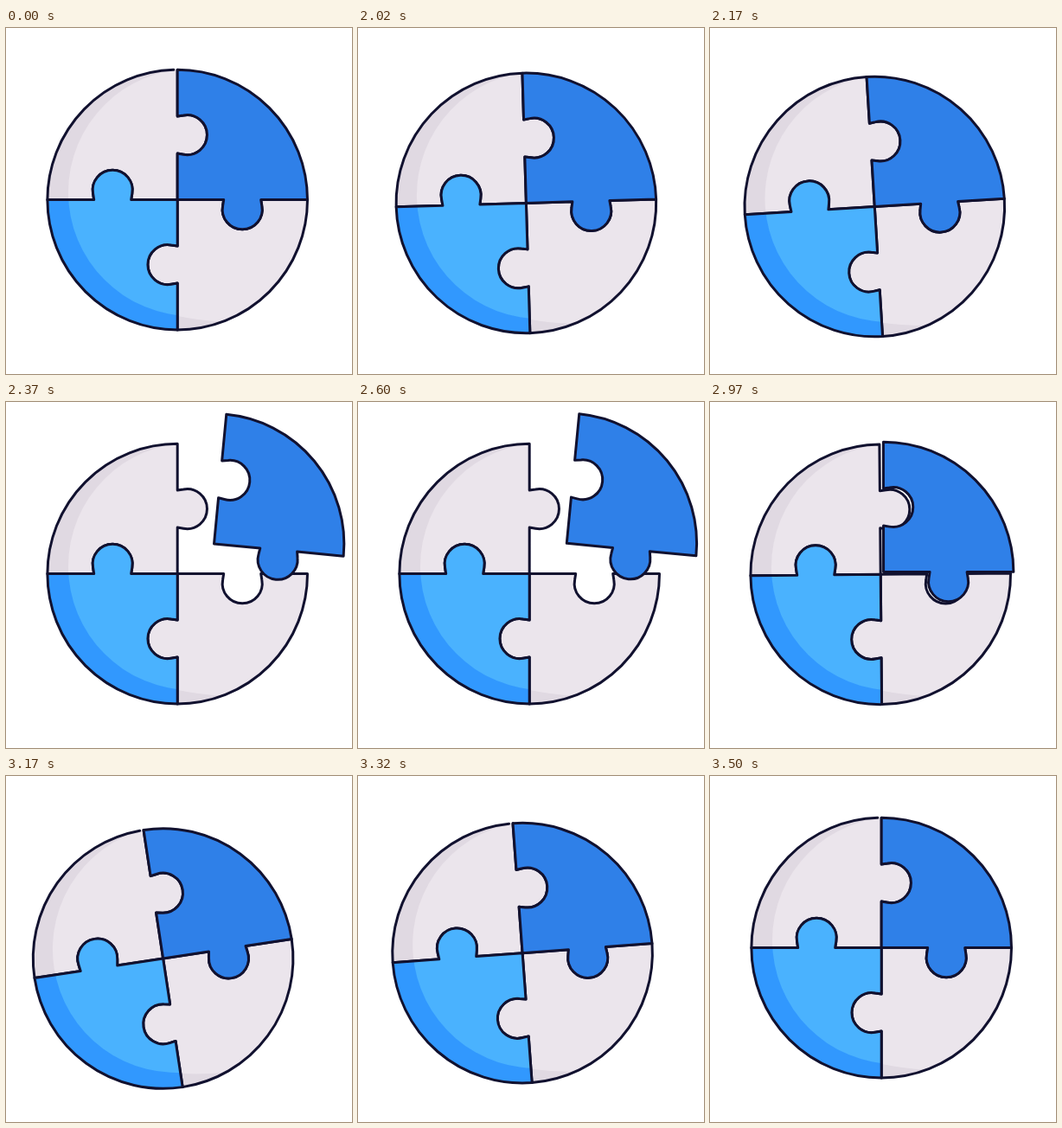
These frames come from a looping animation (400x400 px, 3.52 s). An HTML page with a canvas:

```html
<!DOCTYPE html>
<html lang="en">
<head>
<meta charset="utf-8">
<title>Puzzle circle</title>
<style>
  html, body { margin: 0; width: 100%; height: 100%; overflow: hidden; background: #fff; }
  canvas { display: block; width: 400px; height: 400px; }
</style>
</head>
<body>
<canvas id="stage"></canvas>
<script>
const LOOP = 3520, REST = 2020;
const R = 150.3, CX = 198.2, CY = 198.6;
const INK = '#11112f';
const canvas = document.getElementById('stage');
const ctx = canvas.getContext('2d');
const dpr = window.devicePixelRatio || 1;
canvas.width = canvas.height = 400 * dpr;

// One quarter; the other three are turned copies. It runs from the right end back to the arc.
const SIDES = `M${R} 0 L96.5 0 L97.6 7 A23 23 0 1 1 52.4 7 L53.5 0 L0 0
  L0 -53.5 L7 -52.4 A23 23 0 1 0 7 -97.6 L0 -96.5 L0 ${-R}`;
const quarter = new Path2D(`${SIDES} A${R} ${R} 0 0 1 ${R} 0 Z`);
const slit = 1.7 * Math.PI / 180;
const slitQuarter = new Path2D(
  `${SIDES} A${R} ${R} 0 0 1 ${R * Math.cos(slit)} ${-R * Math.sin(slit)}`);

const highlight = new Path2D();
highlight.arc(16.8, -8.6, 143, 0, 7);
const lowerShade = new Path2D('M-2 134 Q24 139.5 50 141 L50 160 L-2 160 Z');

const ease = {
  hold: () => 0,
  out2: u => 1 - (1 - u) ** 2,
  in2: u => u * u,
  out3: u => 1 - (1 - u) ** 3,
  in3: u => u ** 3,
  outSine: u => Math.sin(u * Math.PI / 2),
  inOut: u => (1 - Math.cos(u * Math.PI)) / 2
};

// Rows: time, easing towards that time, then x, y, degrees
const DISC = [
  [2000, 'hold', 0, 0, 0],
  [2110, 'out2', -11, 11, -4.9],
  [2225, 'in2', 0, 0, 0],
  [2965, 'hold', 0, 0, 0],
  [3130, 'outSine', -17.1, 12.8, -8.9],
  [3500, 'inOut', 0, 0, 0]
];
const PIECE = [
  [2205, 'hold', 0, 0, 0],
  [2455, 'out3', 44, -36, 5.65],
  [2985, 'in3', 0, 0, 0]
];

function pose(rows, t) {
  const i = rows.findIndex(row => t < row[0]);
  if (i < 1) return [0, 0, 0];
  const a = rows[i - 1], b = rows[i];
  const k = ease[b[1]]((t - a[0]) / (b[0] - a[0]));
  return [2, 3, 4].map(n => a[n] + (b[n] - a[n]) * k);
}

function place([x, y, deg]) {
  ctx.translate(x, y);
  ctx.rotate(deg * Math.PI / 180);
}

function drawQuarter(turn, base, shade, light, outline = quarter) {
  const angle = turn * Math.PI / 2;
  ctx.save();
  ctx.rotate(angle);
  ctx.save();
  ctx.fillStyle = base;
  ctx.fill(quarter);
  if (shade) {
    ctx.clip(quarter);
    ctx.rotate(-angle);
    ctx.fillStyle = light;
    ctx.fill(shade);
  }
  ctx.restore();
  ctx.stroke(outline);
  ctx.restore();
}

function draw(now) {
  let t = now % LOOP;
  if (t < REST) t = 0;
  const slitOpen = t < REST || t > 2985;

  ctx.setTransform(dpr, 0, 0, dpr, 0, 0);
  ctx.fillStyle = '#fff';
  ctx.fillRect(0, 0, 400, 400);
  ctx.strokeStyle = INK;
  ctx.lineWidth = 3;
  ctx.lineJoin = ctx.lineCap = 'round';

  ctx.translate(CX, CY);
  place(pose(DISC, t));
  drawQuarter(3, '#e0d9e2', highlight, '#ebe5ec', slitOpen ? slitQuarter : quarter);
  drawQuarter(1, '#ebe5ec', lowerShade, '#e0d9e2');
  drawQuarter(2, '#3198fe', highlight, '#4ab2fe');
  // The tab of the lower right quarter lies over its neighbour
  place(pose(PIECE, t));
  drawQuarter(0, '#2f80e8');
}

const start = performance.now();
function tick() {
  draw(performance.now() - start);
  requestAnimationFrame(tick);
}
tick();
</script>
</body>
</html>
```
